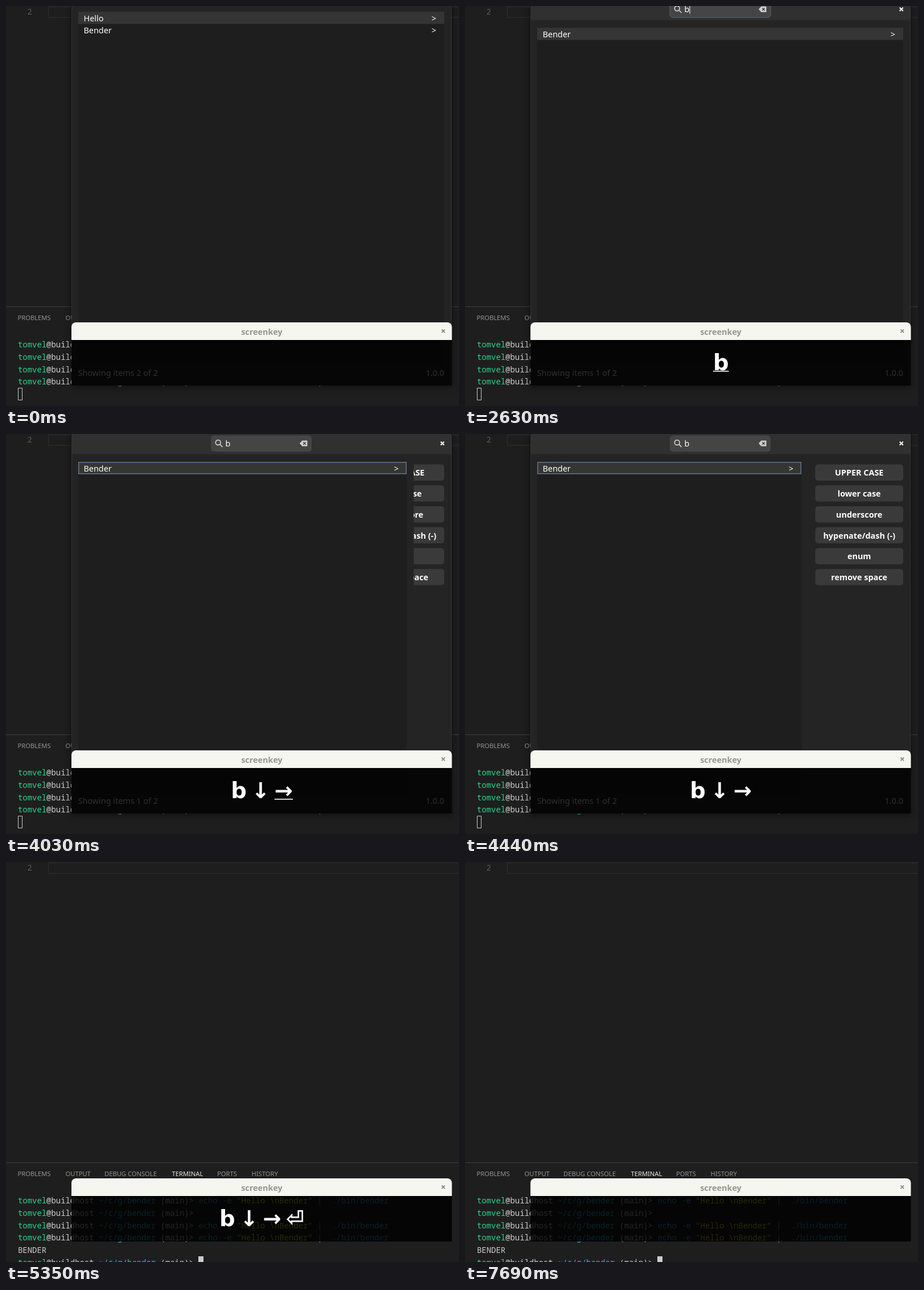
An HTML page with a canvas that plays this animation: 796 by 703 pixels, repeating every 8490 ms.

```html
<!DOCTYPE html>
<html lang="en">
<head>
<meta charset="utf-8">
<title>Launcher demo</title>
<style>
  html, body { margin: 0; height: 100%; overflow: hidden; background: #1e1e1e; }
  canvas { display: block; }
</style>
</head>
<body>
<canvas id="stage" width="796" height="703"></canvas>
<script>
const LOOP = 8490, W = 796, H = 703;
const UI = '14.4px "Noto Sans", sans-serif';
const BOLD = 'bold ' + UI;
const TAB = '11.2px "Noto Sans", sans-serif';
const MONO = '13.92px "Noto Sans Mono", monospace';
const KEY = 'bold 38.5px "DejaVu Sans", sans-serif';

const screen = document.getElementById('stage').getContext('2d');
const layer = document.createElement('canvas');
layer.width = W;
layer.height = H;
const win = layer.getContext('2d');

const progress = (t, start, length) => Math.min(1, Math.max(0, (t - start) / length));
const easeOut = (p, power = 3) => 1 - (1 - p) ** power;

function text(c, str, x, y, font, color, align = 'left') {
  c.font = font;
  c.fillStyle = color;
  c.textAlign = align;
  c.fillText(str, x, y);
}

function rect(c, x, y, w, h, color) {
  c.fillStyle = color;
  c.fillRect(x, y, w, h);
}

function box(c, x, y, w, h, r, fill, stroke, lineWidth = 1) {
  c.beginPath();
  c.roundRect(x, y, w, h, r);
  if (fill) { c.fillStyle = fill; c.fill(); }
  if (stroke) { c.strokeStyle = stroke; c.lineWidth = lineWidth; c.stroke(); }
}

function cross(c, x, y, r, color, width) {
  c.strokeStyle = color;
  c.lineWidth = width;
  c.beginPath();
  c.moveTo(x - r, y - r); c.lineTo(x + r, y + r);
  c.moveTo(x + r, y - r); c.lineTo(x - r, y + r);
  c.stroke();
}

const ring = alpha => `rgba(108,140,172,${alpha})`;

// Editor and terminal

const PROMPT = [['tomvel', '#2bd48a'], ['@buildhost ', '#cccccc'],
  ['~/c/g/bender', '#29b8db'], [' (main)> ', '#cccccc']];
const COMMAND = [['echo', '#29a8e0'], [' -e ', '#29b8db'], ['"Hello \\nBender"', '#d8d81a'],
  [' |  ', '#23b87b'], ['./bin/bender', '#29a8e0']];

function terminalLine(row, parts) {
  let x = 21;
  for (const [str, color] of parts) {
    text(screen, str, x, 600.3 + row * 21.7, MONO, color);
    x += str.length * 8.352;
  }
}

function drawEditor(t) {
  rect(screen, 0, 0, W, H, '#1e1e1e');
  text(screen, '2', 37.5, 15, MONO, '#5a5a5a');
  box(screen, 74.5, 1.5, 740, 18.5, 0, null, '#2b2b2b', 1.5);
  rect(screen, 0, 528, W, 1, '#3e3e3e');
  [['PROBLEMS', 20.5], ['OUTPUT', 104.5], ['DEBUG CONSOLE', 173], ['TERMINAL', 291.5],
    ['PORTS', 371], ['HISTORY', 431.5]].forEach(([name, x]) =>
    text(screen, name, x, 552, TAB, name === 'TERMINAL' ? '#e7e7e7' : '#949494'));

  for (let row = 0; row < 4; row++) {
    terminalLine(row, row === 1 ? PROMPT : [...PROMPT, ...COMMAND]);
  }
  if (t >= 5150) {
    terminalLine(4, [['BENDER', '#cccccc']]);
    terminalLine(5, PROMPT);
    rect(screen, 338, 693, 9, 10, '#cccccc');
  } else if (t >= 5030) {
    rect(screen, 21, 671, 8.5, 22, '#cccccc');
  } else {
    box(screen, 21.5, 671.5, 7, 21, 0, null, '#cccccc');
  }
}

// Launcher window

function drawHeader(t, y) {
  win.save();
  win.translate(0, y);
  rect(win, 116, -40, 667, 76, '#303030');
  rect(win, 116, 35, 667, 1, '#292929');
  box(win, 360, 2.5, 177, 28.5, 5.5, '#454545');
  const focus = progress(t, 2540, 200) * (1 - progress(t, 3420, 200));
  if (focus) box(win, 360, 2.5, 177, 28.5, 5.5, null, ring(focus * .8), 1.5);

  win.strokeStyle = '#d0d0d0';
  win.lineWidth = 1.7;
  win.beginPath();
  win.arc(372.7, 15, 4.4, 0, 7);
  win.moveTo(376, 18.3);
  win.lineTo(380.5, 22.8);
  win.stroke();

  text(win, 'b', 385.5, 22, UI, '#ffffff');
  if (t < 3410) rect(win, 394.5, 8.5, 1, 16, '#ffffff');

  win.fillStyle = '#d0d0d0';
  win.beginPath();
  win.moveTo(516, 16.5);
  win.lineTo(520.5, 11.5);
  win.lineTo(529.5, 11.5);
  win.lineTo(529.5, 21.5);
  win.lineTo(520.5, 21.5);
  win.fill();
  cross(win, 524.5, 16.5, 2.2, '#454545', 1.6);
  cross(win, 766.8, 16.5, 3, '#ffffff', 2);
  win.restore();
}

function drawList(t, top, right, filtered) {
  win.globalAlpha = 1 - .7 * progress(t, 4990, 70);
  rect(win, 127, top, right - 127, 632 - top, '#1e1e1e');
  rect(win, 127, top, right - 127, 21.5, '#353535');
  (filtered ? ['Bender'] : ['Hello', 'Bender']).forEach((name, i) => {
    const y = top + 16.5 + i * 21.8;
    text(win, name, 136.5, y, UI, '#ffffff');
    text(win, '>', right - 22.3, y, UI, '#ffffff');
  });
  const focus = progress(t, 3430, 200) * (1 - progress(t, 4440, 180));
  if (focus) box(win, 127.75, top + .75, right - 128.5, 20, 0, null, ring(focus * .75), 1.5);
  win.globalAlpha = 1;
}

function drawActions(t, clipLeft) {
  const focus = progress(t, 4440, 180);
  win.save();
  win.beginPath();
  win.rect(clipLeft, 40, 783 - clipLeft, 600);
  win.clip();
  ['UPPER CASE', 'lower case', 'underscore', 'hypenate/dash (-)', 'enum', 'remove space']
    .forEach((label, i) => {
      const y = 53.5 + i * 36.75;
      box(win, 615.5, y, 154.5, 28.5, 5, '#3a3a3a');
      if (i === 0 && focus) {
        box(win, 616.5, y + 1, 152.5, 26.5, 4.5, `rgba(255,255,255,${focus * .06})`, ring(focus * .9), 2);
      }
      text(win, label, 692.7, y + 19.8, BOLD, '#ffffff', 'center');
    });
  win.restore();
}

function drawWindow(t) {
  const closing = easeOut(progress(t, 5090, 90), 2);
  if (closing === 1) return;

  const filtered = t >= 2540;
  const drop = 39 * easeOut(progress(t, 2544, 250));
  const slide = easeOut(progress(t, 3970, 500));
  const right = t < 3970 ? 770 : 758 - 167 * slide;

  win.clearRect(0, 0, W, H);
  win.save();
  win.shadowColor = 'rgba(0,0,0,.55)';
  win.shadowBlur = 12;
  win.shadowOffsetY = 2;
  box(win, 115, -6, 668, 673, [12, 12, 0, 0], '#242424');
  win.restore();

  win.save();
  win.beginPath();
  win.roundRect(115, -6, 668, 673, [12, 12, 0, 0]);
  win.clip();
  drawList(t, 10 + drop, right, filtered);
  if (t >= 3970) drawActions(t, right + 12.5);
  if (drop) drawHeader(t, drop - 39);
  text(win, `Showing items ${filtered ? 1 : 2} of 2`, 126.5, 649.7, UI, '#ffffff');
  text(win, '1.0.0', 770, 649.7, UI, '#ffffff', 'right');
  box(win, 115.5, -5.5, 667, 672, [12, 12, 0, 0], null, 'rgba(255,255,255,.07)');
  win.restore();

  const scale = 1 - .2 * closing;
  screen.save();
  screen.globalAlpha = 1 - closing;
  screen.translate(449, 320);
  screen.scale(scale, scale);
  screen.drawImage(layer, -449, -320);
  screen.restore();
}

// Key display: glyph, offset from the first key, advance, press time, underline end

const KEYS = [
  ['b', 0, 27.6, 2510, 2810],
  ['↓', 36, 32.3, 3410, 3680],
  ['→', 76.5, 32.3, 3970, 4270],
  ['⏎', 117, 32.3, 4990, 5350]
];

function drawKeys(t) {
  rect(screen, 115, 586, 668.5, 81, 'rgba(0,0,0,.82)');
  box(screen, 115, 556, 668.5, 31, [8, 8, 0, 0], '#f6f6f1');
  text(screen, 'screenkey', 449.5, 578, BOLD, '#969691', 'center');
  cross(screen, 768.3, 571.3, 2.8, '#8a8a86', 1.8);

  const pressed = KEYS.filter(key => t >= key[3]);
  if (!pressed.length || t >= 7690) return;
  const [, offset, advance, , underlineEnd] = pressed[pressed.length - 1];
  const left = 449.7 - (offset + advance) / 2;
  screen.globalAlpha = t < 7650 ? 1 : .5;
  for (const [glyph, x] of pressed) text(screen, glyph, left + x, 640, KEY, '#ffffff');
  if (t < underlineEnd) rect(screen, left + offset, 641, advance, 1.6, '#ffffff');
  screen.globalAlpha = 1;
}

function draw() {
  const t = performance.now() % LOOP;
  drawEditor(t);
  drawWindow(t);
  drawKeys(t);
  requestAnimationFrame(draw);
}
draw();
</script>
</body>
</html>
```
